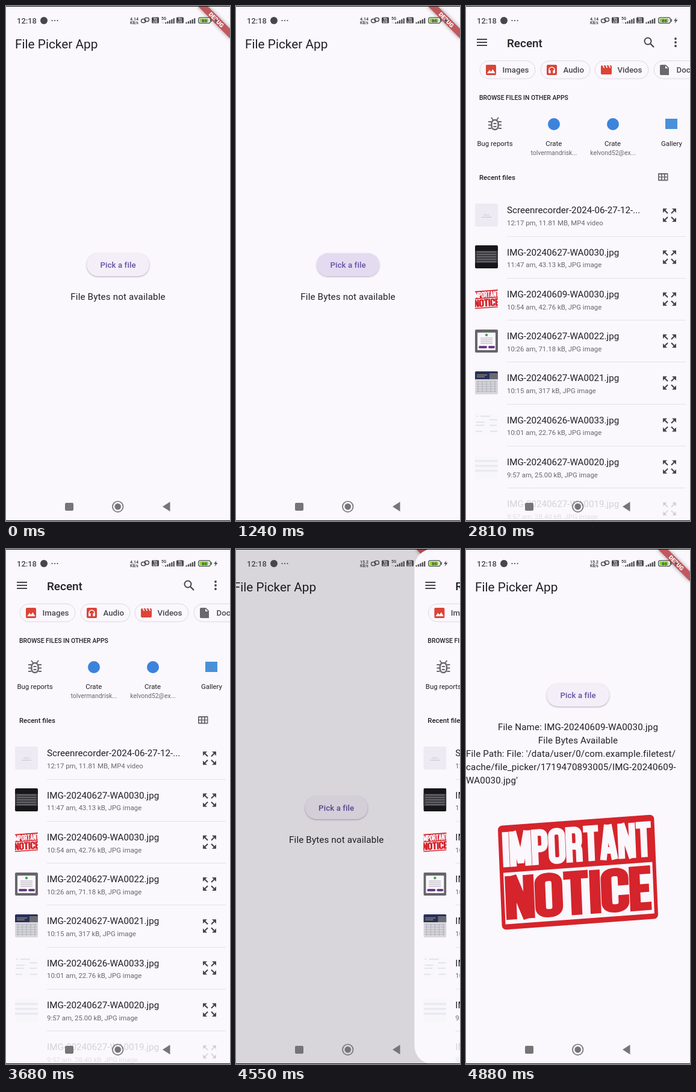
Animation of 372x850 px, one loop 5540 ms. Source, as an HTML page with a canvas:

```html
<!DOCTYPE html>
<html lang="en">
<head>
<meta charset="utf-8">
<title>File picker demo</title>
<style>
  html, body { margin: 0; width: 100%; height: 100%; overflow: hidden; background: #faf7fd; }
  canvas { display: block; }
</style>
</head>
<body>
<canvas id="stage" width="372" height="850"></canvas>
<script>
const W = 372, H = 850, LOOP = 5540;
const ctx = document.getElementById('stage').getContext('2d');
const PAPER = '#faf7fd', INK = '#202023', GREY = '#68686d', NAV = '#757578', STATUS = '#47474b', RED = '#db4437', STAMP = '#d5242b';

const clamp = v => Math.max(0, Math.min(1, v));
const easeOut = v => 1 - (1 - clamp(v)) ** 3;

function text(s, x, y, size, color = INK, weight = 400, align = 'left', spacing = 0) {
  ctx.font = `${weight} ${size}px Roboto, sans-serif`;
  ctx.letterSpacing = spacing + 'px';
  ctx.textAlign = align;
  ctx.fillStyle = color;
  ctx.fillText(s, x, y);
}
function rect(x, y, w, h, color, r = 0) {
  ctx.fillStyle = color;
  ctx.beginPath();
  ctx.roundRect(x, y, w, h, r);
  ctx.fill();
}
function outline(x, y, w, h, r, color, width) {
  ctx.strokeStyle = color;
  ctx.lineWidth = width;
  ctx.beginPath();
  ctx.roundRect(x, y, w, h, r);
  ctx.stroke();
}
function disc(x, y, r, color) {
  ctx.fillStyle = color;
  ctx.beginPath();
  ctx.arc(x, y, r, 0, 7);
  ctx.fill();
}
function ring(x, y, r, color, width) {
  outline(x - r, y - r, 2 * r, 2 * r, r, color, width);
}
function line(d, color, width) {
  ctx.strokeStyle = color;
  ctx.lineWidth = width;
  ctx.stroke(new Path2D(d));
}
function fill(d, color) {
  ctx.fillStyle = color;
  ctx.fill(new Path2D(d));
}
function at(x, y, draw) {
  ctx.save();
  ctx.translate(x, y);
  draw();
  ctx.restore();
}

// Condensed block capitals: [advance, stroke path], 60 units tall
const BOWL = 'M5 60V5H14Q22 5 22 14V24Q22 33 14 33H5';
const GLYPHS = {
  I: [10, 'M5 0V60'],
  M: [36, 'M5 60V0M31 60V0M6 0L18 54L30 0'],
  P: [27, BOWL],
  R: [28, BOWL + 'M14 33Q22 33 22 41V60'],
  O: [28, 'M14 5Q5 5 5 14V46Q5 55 14 55Q23 55 23 46V14Q23 5 14 5Z'],
  T: [26, 'M0 5H26M13 5V60'],
  A: [30, 'M5 60L14 0M25 60L16 0M8 44H22'],
  N: [29, 'M5 60V0M24 60V0M6 0L23 60'],
  C: [28, 'M23 24V14Q23 5 14 5Q5 5 5 14V46Q5 55 14 55Q23 55 23 46V37'],
  E: [22, 'M22 5H5V55H22M5 30H20']
};
function blockWord(word, x, y, sx, sy, color) {
  at(x, y, () => {
    ctx.scale(sx, sy);
    ctx.miterLimit = 2;
    for (const c of word) {
      const [advance, path] = GLYPHS[c];
      line(path, color, 11.3);
      ctx.translate(advance + 2, 0);
    }
  });
}
function stamp(x, y, scale) {
  at(x, y, () => {
    ctx.scale(scale, scale);
    ctx.rotate(-0.072);
    ctx.transform(1, 0, -0.03, 1, 0, 0);
    rect(-130, -86, 260, 172, STAMP, 7);
    blockWord('IMPORTANT', -123, -75, 0.965, 0.97, PAPER);
    rect(-124, -8, 248, 85, PAPER);
    blockWord('NOTICE', -121, -2, 1.575, 1.2, STAMP);
  });
}

function debugRibbon() {
  at(W, 0, () => {
    ctx.rotate(Math.PI / 4);
    ctx.shadowColor = 'rgba(0,0,0,.4)';
    ctx.shadowBlur = 6;
    rect(-38, 26.5, 76, 11.4, '#c2585e');
    ctx.shadowBlur = 0;
    text('DEBUG', 0, 35.6, 9.6, '#fff', 900, 'center');
  });
}
function pickButton(y, press) {
  ctx.save();
  ctx.shadowColor = 'rgba(60,50,80,.4)';
  ctx.shadowBlur = 2.5;
  ctx.shadowOffsetY = 1;
  rect(134, y - 19, 104, 38, '#f3eef8', 19);
  ctx.restore();
  if (press) rect(134, y - 19, 104, 38, `rgba(228,219,240,${press})`, 19);
  text('Pick a file', 186, y + 4.5, 13.26, '#6750a4', 500, 'center', 0.1);
}
function appScreen(t) {
  rect(0, 0, W, H, PAPER);
  text('File Picker App', 15, 70, 20.8);
  const body = (s, x, y, align) => text(s, x, y, 15.15, INK, 400, align, 0.15);
  if (t < 4800) {
    pickButton(427, clamp((t - 1180) / 60) * clamp((1700 - t) / 300));
    body('File Bytes not available', 186, 485, 'center');
  } else {
    pickButton(241, 0);
    body('File Name: IMG-20240609-WA0030.jpg', 186, 299, 'center');
    body('File Bytes Available', 186, 320.5, 'center');
    ["File Path: File: '/data/user/0/com.example.filetest/", 'cache/file_picker/1719470893005/IMG-20240609-', "WA0030.jpg'"]
      .forEach((s, i) => body(s, 0, 342.5 + i * 22));
    stamp(186, 533.5, 1);
  }
  debugRibbon();
}

const CHIPS = [
  [23, 92, 'Images', () => {
    rect(0, 0, 17, 17, RED, 2);
    fill('M2 14L6 8.5L8.5 11.5L11.5 7.5L15.5 14Z', PAPER);
  }],
  [124, 82, 'Audio', () => {
    rect(0, 0, 17, 17, RED, 2);
    line('M4 13V8.5A4.5 4.5 0 0 1 13 8.5V13', PAPER, 1.6);
    rect(3.4, 9, 3.2, 5, PAPER);
    rect(10.4, 9, 3.2, 5, PAPER);
  }],
  [214, 89, 'Videos', () => {
    rect(0, 1, 18, 15, RED, 2);
    line('M3 0L5.5 5M8 0L10.5 5M13 0L15.5 5', PAPER, 1.7);
  }],
  [312, 110, 'Documents', () => {
    fill('M2 0H10L15 5V17H2Q0 17 0 15V2Q0 0 2 0Z', GREY);
    fill('M9 1.5V6H13.5Z', PAPER);
  }]
];
const ROWS = [
  ['Screenrecorder-2024-06-27-12-...', '12:17 pm, 11.81 MB, MP4 video'],
  ['IMG-20240627-WA0030.jpg', '11:47 am, 43.13 kB, JPG image'],
  ['IMG-20240609-WA0030.jpg', '10:54 am, 42.76 kB, JPG image'],
  ['IMG-20240627-WA0022.jpg', '10:26 am, 71.18 kB, JPG image'],
  ['IMG-20240627-WA0021.jpg', '10:15 am, 317 kB, JPG image'],
  ['IMG-20240626-WA0033.jpg', '10:01 am, 22.76 kB, JPG image'],
  ['IMG-20240627-WA0020.jpg', '9:57 am, 25.00 kB, JPG image'],
  ['IMG-20240627-WA0019.jpg', '9:57 am, 28.40 kB, JPG image']
];
const THUMBS = [
  () => {
    rect(0, 0, 38, 38, '#eeeaf3');
    rect(14, 18, 10, 2, '#dcd6e6');
    rect(11, 22, 16, 1, '#c5c1cc');
  },
  () => {
    rect(0, 0, 38, 38, '#17171a');
    rect(0, 9, 38, 20, '#38383d');
    for (let y = 11; y < 28; y += 4) line(`M3 ${y}H35`, '#8e8e94', 1);
  },
  () => {
    rect(0, 0, 38, 38, PAPER);
    stamp(19, 19, 0.17);
  },
  () => {
    rect(0, 0, 38, 38, '#66666a');
    rect(4, 5, 30, 29, PAPER, 1);
    disc(19, 9, 2.2, '#4aa352');
    for (let y = 14; y < 25; y += 3) line(`M9 ${y}H29`, '#a9a9b0', 1);
    rect(6, 27, 14, 4, '#6a3a80', 2);
    rect(22, 27, 11, 4, '#6a3a80', 2);
  },
  () => {
    rect(0, 0, 38, 38, '#d8d7dc');
    rect(0, 0, 38, 13, '#28305a');
    rect(24, 3, 14, 10, '#6a6a72');
    line('M3 6H20M3 9H16', '#c8b878', 1);
    for (let i = 0; i < 5; i++) line(`M2 ${17 + i * 4}H36M${5 + i * 7} 16V35`, '#a2a2ac', 0.7);
  },
  () => {
    rect(0, 0, 38, 38, '#f8f7fb');
    line('M2 5H5M9 5H25M2 15H16M24 11H37M1 20H15M24 20H36M1 30H12M25 30H37', '#d2d1da', 1.2);
  },
  () => {
    rect(0, 0, 38, 38, '#f7f6fb');
    for (let y = 9; y < 33; y += 8) line(`M0 ${y}H38`, '#e9e8f0', 3);
  }
];

function expandIcon(x, y) {
  for (const sx of [-1, 1]) for (const sy of [-1, 1]) at(x, y, () => {
    ctx.scale(sx, sy);
    fill('M11 11H4L11 4Z', STATUS);
    line('M3 3L9 9', STATUS, 2.2);
  });
}
function bugIcon(x, y) {
  at(x, y, () => {
    outline(-5.5, -7, 11, 16, 5.5, GREY, 2.4);
    line('M-11 -4H-6M6 -4H11M-11 1.5H-6M6 1.5H11M-11 7H-6M6 7H11M-6 -11L-3 -7M6 -11L3 -7M-2.5 -1H2.5M-2.5 4H2.5', GREY, 2);
  });
}
function pickerHeader() {
  line('M18 55H35M18 60H35M18 65H35', STATUS, 1.9);
  text('Recent', 68, 68, 18.94, INK, 500);
  for (const [x, width, label, icon] of CHIPS) {
    outline(x, 90.5, width, 29.5, 14.75, '#dadae0', 1);
    at(x + 10, 97, icon);
    text(label, x + 37.5, 110, 13.26, STATUS, 500);
  }
  text('BROWSE FILES IN OTHER APPS', 22, 155, 10.4, INK, 500);
  bugIcon(48, 195);
  disc(146, 195, 10, '#3c83dc');
  disc(244, 195, 10, '#3c83dc');
  rect(331, 186, 20, 17, '#4a90d8');
  ['Bug reports', 'Crate', 'Crate', 'Gallery'].forEach((s, i) => text(s, 48 + i * 97.8, 231, 11.4, INK, 400, 'center'));
  text('tolvermandrisk...', 146, 246, 10.4, GREY, 400, 'center');
  text('kelvond52@ex...', 244, 246, 10.4, GREY, 400, 'center');
}
function pickerList() {
  ring(302, 58, 5.5, STATUS, 2);
  line('M306 62L312 68', STATUS, 2.4);
  for (const y of [54, 60, 66]) disc(348, y, 1.9, STATUS);
  text('Recent files', 22, 287, 11.4, INK, 500);
  rect(319, 276, 16.5, 12.5, GREY, 1);
  for (let i = 0; i < 6; i++) rect(320.8 + i % 3 * 5, 278 + (i > 2) * 5, 3.2, 3.6, PAPER);

  ROWS.forEach(([name, info], i) => {
    const y = 326 + i * 69.25;
    ctx.globalAlpha = i < 7 ? 1 : 0.17;
    if (THUMBS[i]) at(15, Math.round(y), () => {
      ctx.beginPath();
      ctx.roundRect(0, 0, 38, 38, 2);
      ctx.clip();
      THUMBS[i]();
    });
    text(name, 68, y + 16.3, 15.2);
    text(info, 68, y + 36, 11.4, GREY);
    expandIcon(338, y + 19.3);
    if (i < 7) rect(68, Math.round(y + 53.5), 297, 1, '#e3e3e8');
  });
  ctx.globalAlpha = 1;
}

function signal(x, count) {
  for (let i = 0; i < count; i++) rect(x + i * 3.4, 27 - i * 1.7, 2.2, 2 + i * 1.7, STATUS);
}
function voiceBadge(x) {
  rect(x, 18.5, 12, 10, STATUS, 1.5);
  text('Vo', x + 6, 23.2, 5, PAPER, 700, 'center');
  text('LTE', x + 6, 27.6, 4.5, PAPER, 700, 'center');
}
function systemBars(t) {
  text('12:18', 18, 28.5, 13, STATUS, 500);
  disc(63, 24, 6, STATUS);
  for (const x of [76.5, 81, 85.5]) disc(x, 24, 1.1, STATUS);
  text(t < 4200 ? '4.14' : '15.2', 213, 23.5, 7, STATUS, 700, 'center');
  text('KB/s', 213, 30, 6.4, STATUS, 700, 'center');
  outline(224.5, 21.5, 7.5, 6, 3, STATUS, 1.4);
  outline(230, 19.5, 7.5, 6, 3, STATUS, 1.4);
  voiceBadge(242);
  text('5G', 258, 22.5, 6.5, STATUS, 700);
  text('↑↓', 258, 29, 4.5, STATUS, 700);
  signal(264, 5);
  voiceBadge(283);
  signal(298.5, 5);
  rect(319, 18.5, 21, 10.5, STATUS, 3.5);
  rect(320.2, 19.7, 18.6, 8.1, PAPER, 2.4);
  rect(321.2, 20.7, 15, 6.1, '#86d936', 1.5);
  rect(340.5, 21.5, 1.5, 4.5, STATUS);
  text('86', 329.5, 27, 8, STATUS, 700, 'center');
  fill('M349.5 19L345 24.6H348L346.5 29L351.5 22.8H348.3Z', STATUS);

  rect(98, 820, 14, 13, NAV, 2);
  ring(185.7, 826.3, 8.8, NAV, 1.7);
  disc(185.7, 826.3, 5.3, NAV);
  fill('M260 826.3L272.5 818.3V834.3Z', NAV);
  rect(0, 0, W, 1, '#111');
  rect(0, 849, W, 1, '#111');
}

function frame() {
  const t = performance.now() % LOOP;
  const cover = easeOut((t - 1480) / 500) - easeOut((t - 4345) / 500);
  at(-cover * W * 0.255, 0, () => appScreen(t));
  if (cover > 0) {
    const x = W * (1 - cover);
    rect(0, 0, W, H, `rgba(0,0,0,${Math.min(0.5, cover * 0.65)})`);
    at(x, 0, () => {
      rect(0, 0, W + 40, H, PAPER, Math.min(30, x));
      pickerHeader();
      if (t > 2390) pickerList();
    });
  }
  systemBars(t);
  requestAnimationFrame(frame);
}
frame();
</script>
</body>
</html>
```
